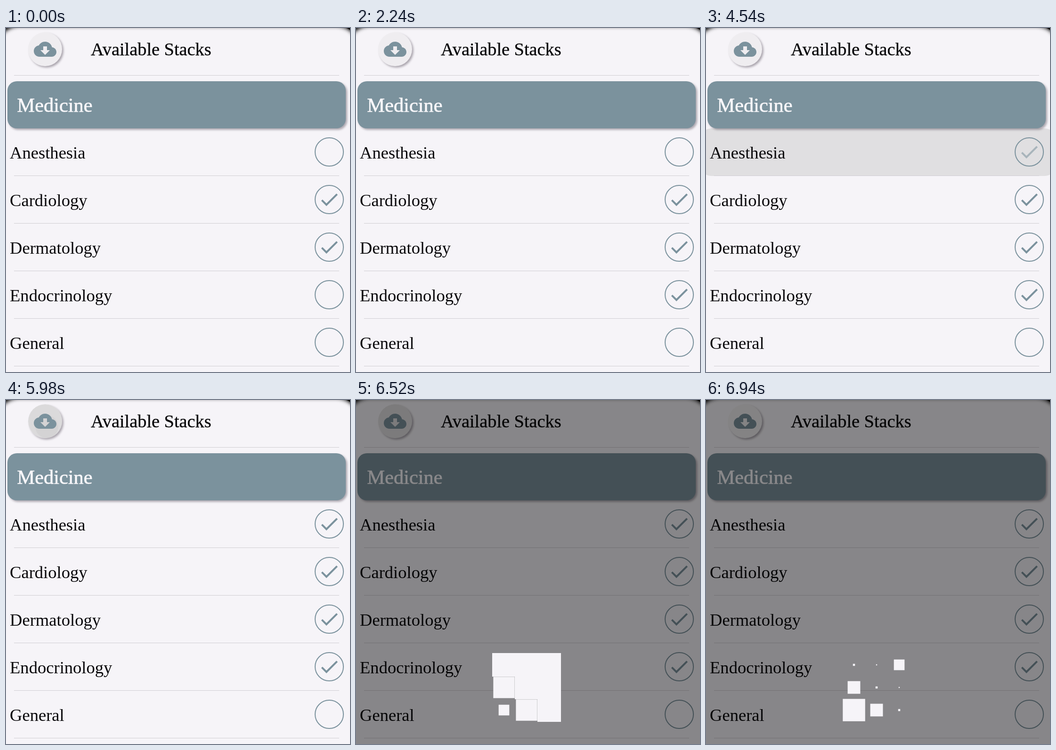
Write an HTML page that moves like this. It is 730 px wide and 730 px high and loops after 6.97 s.

```html
<!DOCTYPE html>
<html lang="en">
<head>
<meta charset="utf-8">
<title>Available Stacks</title>
<style>
  html, body { margin: 0; width: 100%; height: 100%; overflow: hidden; background: #f6f4f8; }
  svg { display: block; width: 100vw; height: 100vh; }
  text { font-family: "Liberation Serif", serif; }
  .item { font-size: 36.6px; fill: #08070a; }
  .title { font-size: 38.3px; fill: #050507; stroke: #050507; stroke-width: .3; }
  .group { font-size: 42.4px; fill: #f8f7fa; stroke: #f8f7fa; stroke-width: .7; }
  .line { stroke: #d0ced3; }
  .ring { fill: none; stroke: #7b929d; stroke-width: 2; }
  .check { fill: #7b929d; }
  .raised { filter: drop-shadow(3px 3px 2px rgba(60, 50, 65, .4)); }
  .edge { filter: blur(4px); }
</style>
</head>
<body>
<svg id="stage" viewBox="0 0 730 730">
  <rect width="730" height="730" fill="#f6f4f8"/>
  <path class="line" d="M17 100.5H707"/>
  <circle class="raised" cx="83" cy="45" r="36" fill="#efedf0"/>
  <g id="inks"></g>
  <path fill="#7b929d" transform="translate(59 21) scale(2)" d="M19.35 10.04C18.67 6.59 15.64 4 12 4 9.11 4 6.6 5.64 5.35 8.04 2.34 8.36 0 10.91 0 14c0 3.31 2.69 6 6 6h13c2.76 0 5-2.24 5-5 0-2.64-2.05-4.78-4.65-4.96zM17 13l-5 5-5-5h3V9h4v4h3z"/>
  <text class="title" x="180" y="58">Available Stacks</text>
  <rect class="raised" x="3" y="113" width="718" height="100" rx="20" fill="#7b929d"/>
  <text class="group" x="23.5" y="178">Medicine</text>
  <g id="rows"></g>
  <path class="edge" fill-rule="evenodd" d="M-60-40H790V200H-60ZM-20 200V46A50 50 0 0 1 30-4H700A50 50 0 0 1 750 46V200Z"/>
  <path d="M722 0H730V4Q727 1 722 0Z"/>
  <rect id="dim" width="730" height="730" fill="#000" fill-opacity=".45"/>
  <g id="loader" fill="#f6f4f8"></g>
</svg>
<script>
const LOOP = 6970;
const FADE = 600;
const LOADING = 6290;
const $ = id => document.getElementById(id);
const clamp = v => Math.max(0, Math.min(1, v));
const mix = (a, b, p) => a + (b - a) * p;
const ease = p => .5 - .5 * Math.cos(Math.PI * clamp(p));

function add(parent, tag, attrs, text) {
  const el = document.createElementNS("http://www.w3.org/2000/svg", tag);
  for (const k in attrs) el.setAttribute(k, attrs[k]);
  if (text) el.textContent = text;
  return parent.appendChild(el);
}

// checkAt: time the row becomes ticked
const rows = [
  { name: "Anesthesia", checkAt: 4310, checkMs: 420 },
  { name: "Cardiology", checkAt: -1, checkMs: 1 },
  { name: "Dermatology", checkAt: -1, checkMs: 1 },
  { name: "Endocrinology", checkAt: 1525, checkMs: 400 },
  { name: "General", checkAt: LOOP, checkMs: 1 }
];
rows.forEach((row, i) => {
  const y = 263 + 101 * i;
  add($("rows"), "path", { class: "line", d: `M17 ${y + 50.5}H707` });
  add($("rows"), "text", { class: "item", x: 8, y: y + 14 }, row.name);
  add($("rows"), "circle", { class: "ring", cx: 686, cy: y, r: 30 });
  row.check = add($("rows"), "path", {
    class: "check",
    transform: `translate(662 ${y - 24}) scale(2)`,
    d: "M9 16.17L4.83 12l-1.42 1.41L9 19 21 7l-1.41-1.41z"
  });
});

const rowBox = y => ({ x: -11, y, width: 752, height: 101, rx: 22 });
const presses = [
  { box: rowBox(516), from: [628, 592], to: [365, 566], reach: 670, down: 0, up: 1540 },
  { box: rowBox(213), from: [642, 294], to: [365, 263], reach: 670, down: 2460, up: 4320 },
  { box: { x: 47, y: 9, width: 72, height: 72, rx: 36 }, from: [88, 62], to: [83, 45], reach: 78, down: 5050, up: 6200 }
];
presses.forEach((press, i) => {
  const clip = add($("inks"), "clipPath", { id: "clip" + i });
  add(clip, "rect", press.box);
  press.group = add($("inks"), "g", { "clip-path": `url(#clip${i})` });
  press.glow = add(press.group, "rect", { ...press.box, fill: "#bcbcbc" });
  press.splash = add(press.group, "circle", { fill: "#c8c8c8" });
});

function drawPress({ group, glow, splash, from, to, reach, down, up }, t) {
  const out = 1 - clamp((t - up) / FADE);
  const on = t > down && out > 0;
  group.setAttribute("display", on ? "inline" : "none");
  if (!on) return;
  const p = clamp((Math.min(t, up) - down) / 3000 + Math.max(0, t - up) / 1000);
  glow.setAttribute("fill-opacity", .4 * clamp((t - down) / FADE) * out);
  splash.setAttribute("fill-opacity", .4 * out);
  splash.setAttribute("cx", mix(from[0], to[0], p));
  splash.setAttribute("cy", mix(from[1], to[1], p));
  splash.setAttribute("r", reach * p);
}

const cubes = [];
for (let r = 0; r < 3; r++) {
  for (let c = 0; c < 3; c++) {
    cubes.push({ x: 314 + 48 * c, y: 562 + 48 * r, lag: 105 * (c + 2 - r), el: add($("loader"), "rect", {}) });
  }
}

function drawLoader(t) {
  $("dim").setAttribute("display", t >= LOADING ? "inline" : "none");
  $("loader").setAttribute("opacity", clamp((t - LOADING) / 200));
  for (const { x, y, lag, el } of cubes) {
    const s = (t - 6353 - lag) / 317;
    const size = 50 * (1 - ease(s) + ease(s - 1));
    el.setAttribute("x", x - size / 2);
    el.setAttribute("y", y - size / 2);
    el.setAttribute("width", size);
    el.setAttribute("height", size);
  }
}

function draw(t) {
  for (const { check, checkAt, checkMs } of rows) {
    check.setAttribute("opacity", clamp((t - checkAt) / checkMs));
  }
  for (const press of presses) drawPress(press, t);
  drawLoader(t);
}

const began = performance.now();
function tick() {
  draw((performance.now() - began) % LOOP);
  requestAnimationFrame(tick);
}
tick();
</script>
</body>
</html>
```
